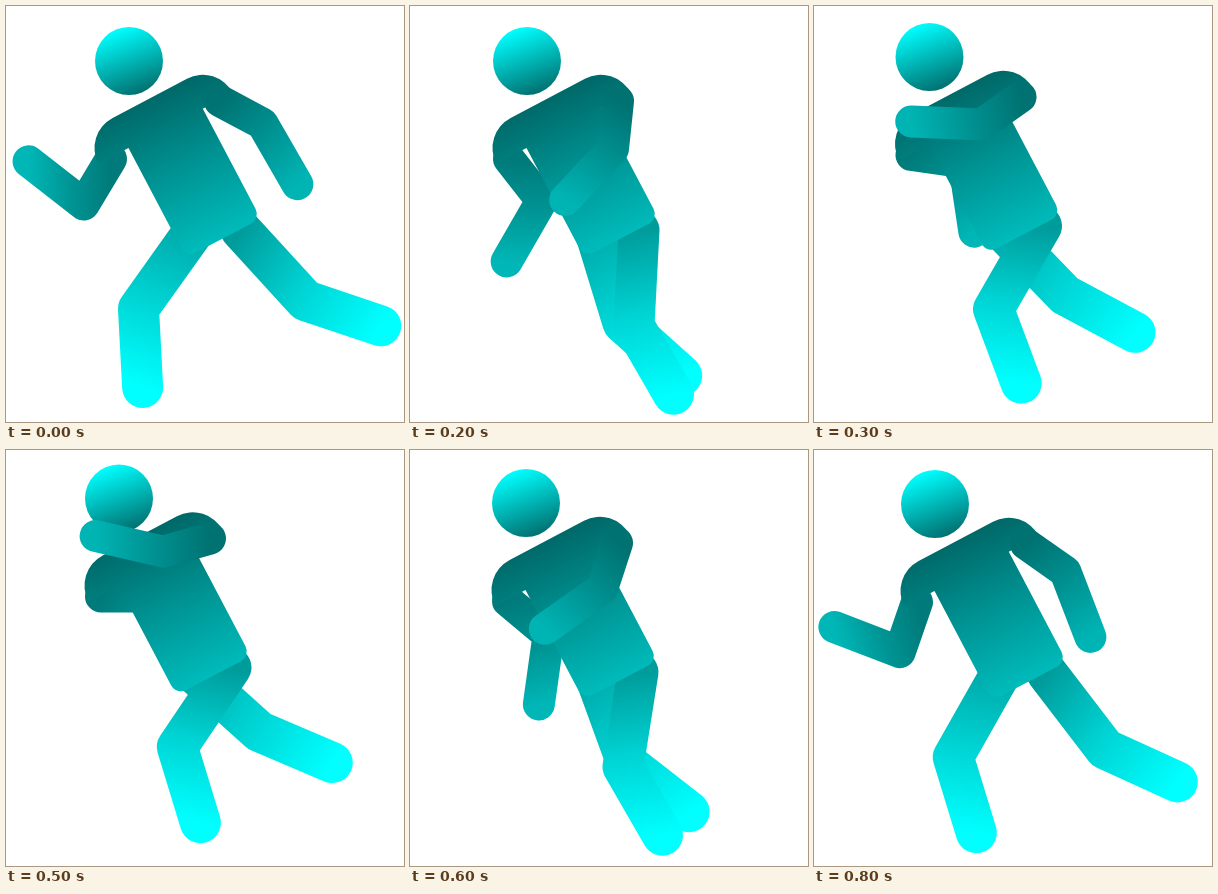
These frames come from a looping animation (398 px wide and 416 px high, 0.9 s). An HTML page with a canvas:

```html
<!DOCTYPE html>
<html lang="en">
<head>
<meta charset="utf-8">
<title>Running figure</title>
<style>
  html, body { margin: 0; width: 100%; height: 100%; overflow: hidden; background: #fff; }
  canvas { display: block; }
</style>
</head>
<body>
<canvas id="stage" width="398" height="416"></canvas>
<script>
const ctx = document.getElementById('stage').getContext('2d');
const STEP = 100;

// Limb angles are [upper, lower] in degrees from straight down, positive to the right.
const poses = [
  { body: [0, 0],    rearArm: [-31, -128], frontArm: [62, 30],    rearLeg: [-35.5, 3],  frontLeg: [42.5, 71.5] },
  { body: [-4, 0],   rearArm: [-1, -73],   frontArm: [41, 1],     rearLeg: [-14.5, 32], frontLeg: [28.5, 51] },
  { body: [-6, 0],   rearArm: [38, -30],   frontArm: [-6, -43],   rearLeg: [17, 48],    frontLeg: [-3, 30] },
  { body: [-7.5, -4], rearArm: [82, 8.5],  frontArm: [-55, -92.5], rearLeg: [44, 62],   frontLeg: [-30, 20.5] },
  { body: [-9, -11], rearArm: [92, 36],    frontArm: [-78, -118], rearLeg: [49, 71],    frontLeg: [-37, 6] },
  { body: [-10, -6.5], rearArm: [90, 33],  frontArm: [-74, -103], rearLeg: [48, 67],    frontLeg: [-34, 17] },
  { body: [-7, -2],  rearArm: [50, -8],    frontArm: [-18, -55],  rearLeg: [20, 52],    frontLeg: [-9, 30] },
  { body: [-5, -1],  rearArm: [12, -48],   frontArm: [30, -10.5], rearLeg: [-8.5, 33],  frontLeg: [21, 42.5] },
  { body: [-2, -1],  rearArm: [-19, -111], frontArm: [55, 21],    rearLeg: [-29.5, 17], frontLeg: [37.5, 65.5] }
];

// Shades run from the root of the limb to its tip.
const limbs = {
  rearArm:  { root: [105, 153], bones: [53, 70], width: 32, shades: [122, 148, 182] },
  frontArm: { root: [214, 95],  bones: [48, 70], width: 32, shades: [114, 146, 180] },
  rearLeg:  { root: [190, 222], bones: [99, 79], width: 41, shades: [166, 212, 255] },
  frontLeg: { root: [235, 224], bones: [96, 79], width: 41, shades: [155, 212, 255] }
};

function gradient(from, to, shades) {
  const fill = ctx.createLinearGradient(...from, ...to);
  shades.forEach((v, i) => fill.addColorStop(i / (shades.length - 1), `rgb(0,${v},${v})`));
  return fill;
}

function along([x, y], length, degrees) {
  const a = degrees * Math.PI / 180;
  return [x + length * Math.sin(a), y + length * Math.cos(a)];
}

function drawLimb(name, pose) {
  const { root, bones, width, shades } = limbs[name];
  const joint = along(root, bones[0], pose[name][0]);
  const tip = along(joint, bones[1], pose[name][1]);
  ctx.beginPath();
  ctx.moveTo(...root);
  ctx.lineTo(...joint);
  ctx.lineTo(...tip);
  ctx.lineWidth = width;
  ctx.lineCap = ctx.lineJoin = 'round';
  ctx.strokeStyle = gradient(root, tip, shades);
  ctx.stroke();
}

function drawTorso() {
  const width = 84, height = 124, shoulder = 34, corner = 11;
  ctx.save();
  ctx.translate(122.5, 142);
  ctx.rotate(-27.8 * Math.PI / 180);
  ctx.beginPath();
  ctx.moveTo(-shoulder, 0);
  ctx.arc(0, 0, shoulder, Math.PI, Math.PI * 1.5);
  ctx.arc(width, 0, shoulder, -Math.PI / 2, 0);
  ctx.lineTo(width, 0);
  ctx.arcTo(width, height, 0, height, corner);
  ctx.arcTo(0, height, 0, 0, corner);
  ctx.lineTo(0, 0);
  ctx.closePath();
  ctx.fillStyle = gradient([46, -34], [36, 126], [105, 148, 188]);
  ctx.fill();
  ctx.restore();
}

function drawHead() {
  ctx.beginPath();
  ctx.arc(123, 55, 34, 0, Math.PI * 2);
  ctx.fillStyle = gradient([111, 23], [135, 87], [255, 112]);
  ctx.fill();
}

function draw(pose) {
  ctx.clearRect(0, 0, 398, 416);
  ctx.save();
  ctx.translate(...pose.body);
  drawLimb('rearArm', pose);
  drawLimb('rearLeg', pose);
  drawLimb('frontLeg', pose);
  drawTorso();
  drawHead();
  drawLimb('frontArm', pose);
  ctx.restore();
}

const start = performance.now();
function tick() {
  const elapsed = performance.now() - start;
  draw(poses[Math.floor(elapsed / STEP) % poses.length]);
  requestAnimationFrame(tick);
}
tick();
</script>
</body>
</html>
```
